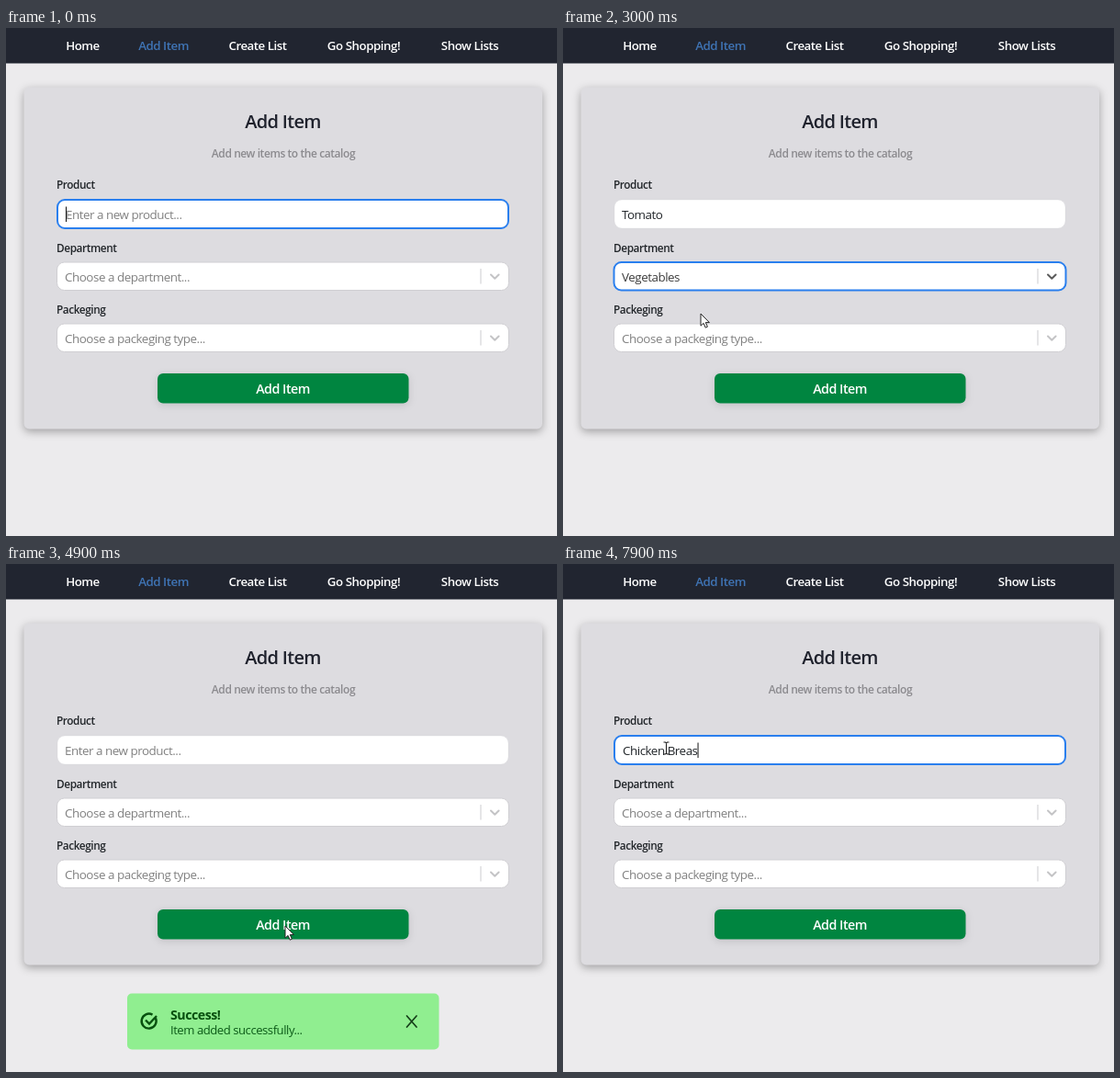
Recreate the animation shown at these times as an HTML page. Size 600 by 553 pixels, loop 8000 ms.

```html
<!DOCTYPE html>
<html lang="en">
<head>
<meta charset="utf-8">
<title>Add Item</title>
<style>
  html, body { margin: 0; width: 100%; height: 100%; overflow: hidden; background: #ecebed; }
  svg { display: block; width: 600px; height: 553px; }
  text { font: 400 13.4px "Open Sans", "Noto Sans", sans-serif; letter-spacing: -.035em; fill: #212529; white-space: pre; }
  .nav text { font-weight: 600; font-size: 13.3px; fill: #fff; text-anchor: middle; }
  .nav .active { fill: #3f74b5; }
  .title { font-size: 20px; font-weight: 600; text-anchor: middle; fill: #1f222d; }
  .sub { font-size: 12px; font-weight: 600; text-anchor: middle; fill: #8b8a8e; }
  .label { font-size: 11.8px; font-weight: 600; }
  .hint { fill: #808080; }
  .value { fill: #3c3c3c; }
  .button { font-size: 14.25px; font-weight: 600; text-anchor: middle; fill: #fff; }
  .card { fill: #dddce0; filter: drop-shadow(0 3px 5px rgba(0, 0, 0, .32)); }
  .box { fill: #fff; stroke: #cfced2; }
  .focus .box { stroke: #2a7fee; stroke-width: 2; }
  .chevron { fill: none; stroke: #c4c4c6; stroke-width: 2; stroke-linecap: round; stroke-linejoin: round; }
  .focus .chevron { stroke: #5c5c5c; }
  .menu { fill: #fff; filter: drop-shadow(0 1px 3px rgba(0, 0, 0, .35)); }
  .toast text { font-size: 13.1px; fill: #0b5a17; }
  .toast .head { font-size: 14.2px; font-weight: 700; fill: #08500f; }
</style>
</head>
<body>
<svg id="stage" viewBox="0 0 600 553"></svg>
<script>
const LOOP = 8000, STEP = 100, ROW = 30.2;
const stage = document.getElementById("stage");

function add(parent, tag, attrs = {}, content = "") {
  const node = document.createElementNS("http://www.w3.org/2000/svg", tag);
  for (const key in attrs) node.setAttribute(key, attrs[key]);
  node.textContent = content;
  return parent.appendChild(node);
}
const group = (parent, cls = "") => add(parent, "g", { class: cls });
const rect = (parent, x, y, width, height, attrs) => add(parent, "rect", { x, y, width, height, ...attrs });
const label = (parent, x, y, content, cls = "") => add(parent, "text", { x, y, class: cls }, content);
const path = (parent, d, attrs) => add(parent, "path", { d, ...attrs });
const show = (node, on) => node.setAttribute("visibility", on ? "visible" : "hidden");

// Page
rect(stage, 0, 0, 600, 553, { fill: "#ecebed" });
rect(stage, 0, 0, 600, 38.5, { fill: "#212530" });
const nav = group(stage, "nav");
[["Home", 83.5], ["Add Item", 171.5], ["Create List", 274], ["Go Shopping!", 389.5], ["Show Lists", 505]]
  .forEach(([name, x], i) => label(nav, x, 24, name, i === 1 ? "active" : ""));
rect(stage, 19.5, 64.5, 564.5, 372, { rx: 6, class: "card" });
label(stage, 301.5, 109, "Add Item", "title");
label(stage, 302, 141, "Add new items to the catalog", "sub");

// Form
label(stage, 55, 175, "Product", "label");
const product = group(stage);
const productBox = rect(product, 56, 187, 491, 31, { rx: 8, class: "box" });
const productText = label(product, 64, 208, "");
const caret = rect(product, 65, 194.5, 1, 16.5, { fill: "#111" });

function makeSelect(name, y, hint) {
  label(stage, 55, y - 11, name, "label");
  const node = group(stage);
  rect(node, 55.5, y, 492, 30.5, { rx: 8, class: "box" });
  rect(node, 516.5, y + 7, 1, 16.5, { fill: "#cccccf" });
  path(node, `M528 ${y + 13.5}l4.3 4.3 4.3-4.3`, { class: "chevron" });
  const text = label(node, 64, y + 21, "");
  return {
    update(focused, value) {
      node.setAttribute("class", focused ? "focus" : "");
      text.textContent = value || hint;
      text.setAttribute("class", value ? "value" : "hint");
    }
  };
}
const department = makeSelect("Department", 255, "Choose a department...");
const packaging = makeSelect("Packeging", 322, "Choose a packeging type...");

rect(stage, 165, 376, 273.5, 32.5, { rx: 6, fill: "#008540", style: "filter:drop-shadow(0 2px 4px rgba(0,0,0,.12))" });
label(stage, 301.5, 398, "Add Item", "button");

// Menus
function makeMenu(y, height, rowWidth, names) {
  const node = group(stage);
  const top = y + 3.3;
  rect(node, 55, y, 493, height, { rx: 3, class: "menu" });
  const mark = rect(node, 55.5, top, rowWidth, ROW, { fill: "#dde9fd" });
  names.forEach((name, i) => label(node, 65, top + 20.5 + i * ROW, name));
  return {
    node,
    hover(pointerY) {
      const i = Math.floor((pointerY - top) / ROW);
      mark.setAttribute("y", top + Math.max(0, Math.min(names.length - 1, i)) * ROW);
    }
  };
}
const departments = makeMenu(292, 245, 479, ["Vegetables", "Fruits", "Dairy", "Frozen", "Meats", "Deli", "Canned Food", "Beauty"]);
rect(departments.node, 534.5, 295, 13, 239, { fill: "#f1f1f1" });
rect(departments.node, 535.5, 306, 10.5, 133, { fill: "#c1c1c1" });
path(departments.node, "M538 301l3-3.5 3 3.5z", { fill: "#a3a3a3" });
path(departments.node, "M538 528l3 3.5 3-3.5z", { fill: "#505050" });
const packages = makeMenu(359, 127.5, 492, ["Individual", "KG", "Gram", "Pack"]);

// Toast
const toast = group(stage, "toast");
rect(toast, 132, 467.5, 339.5, 61, { rx: 5, fill: "#90ee90" });
path(toast, "M163 494.5A8 8 0 1 1 159.5 490.6M152 496.5l4 4 8-8.5",
  { fill: "none", stroke: "#08500f", "stroke-width": 2.4 });
label(toast, 179, 496, "Success!", "head");
label(toast, 179, 512, "Item added successfully...");
path(toast, "M436.5 492l10.5 12M447 492l-10.5 12", { stroke: "#143d18", "stroke-width": 1.7, "stroke-linecap": "round" });

// Pointers, each drawn around its hot spot
const arrow = path(stage, "M0 0V13.2L3.1 10.4 5.2 15.2 7.4 14.2 5.3 9.6H9.4Z",
  { fill: "#fff", stroke: "#222", "stroke-width": 1 });
const beam = path(stage, "M-3-6.5H-1L0-5.5 1-6.5H3M0-5.5V5.5M-3 6.5H-1L0 5.5 1 6.5H3",
  { fill: "none", stroke: "#222", "stroke-width": 1.1 });

// Time, x, y
const route = [
  [1000, 128, 212], [1400, 140, 268], [1700, 140, 270], [2300, 151, 302],
  [2500, 150, 311], [3000, 150, 311], [3200, 125, 338], [3300, 122, 342],
  [3500, 98.5, 420], [3800, 106, 377], [3900, 108, 374], [4200, 108, 374],
  [4700, 300, 391], [4900, 304, 394], [5300, 317, 433], [5600, 440, 496],
  [5700, 440, 496], [6200, 112.5, 200.5], [LOOP, 112.5, 200.5]
];
// Time at which each letter is typed
const typing = [
  ["Tomato", [100, 200, 300, 400, 500, 600]],
  ["Chicken Breas", [6400, 6500, 6600, 6700, 6800, 6900, 7000, 7200, 7300, 7500, 7600, 7700, 7900]]
];

function pointerAt(t) {
  const i = route.findIndex(point => point[0] > t);
  if (i < 1) return [route[0][1], route[0][2]];
  const [t0, x0, y0] = route[i - 1], [t1, x1, y1] = route[i];
  const p = (t - t0) / (t1 - t0), k = p * p * (3 - 2 * p);
  return [x0 + (x1 - x0) * k, y0 + (y1 - y0) * k];
}

function render(t) {
  const within = (from, to) => t >= from && t < to;
  const [x, y] = pointerAt(t);
  const [word, times] = typing[t < 4900 ? 0 : 1];
  const typed = word.slice(0, times.filter(at => at <= t).length);
  const editing = t < 1500 || t >= 6200;

  product.setAttribute("class", editing ? "focus" : "");
  productBox.setAttribute("stroke-opacity", editing ? 1 : .25);
  productText.textContent = typed || "Enter a new product...";
  productText.setAttribute("class", typed ? "" : "hint");
  productText.setAttribute("x", editing ? 65 : 64);
  caret.setAttribute("x", 65 + (typed ? productText.getComputedTextLength() : 0));
  show(caret, editing);

  department.update(within(1500, 3200), within(2600, 4900) ? "Vegetables" : "");
  packaging.update(within(3200, 4800), within(3900, 4900) ? "Individual" : "");
  show(departments.node, within(1500, 2600));
  show(packages.node, within(3200, 3900));
  departments.hover(y);
  packages.hover(y);
  show(toast, within(4900, 5700));

  const overInput = y > 187 && y < 218;
  for (const node of [arrow, beam]) node.setAttribute("transform", `translate(${x} ${y})`);
  show(arrow, t >= 1000 && !overInput);
  show(beam, t >= 1000 && overInput);
}

const start = performance.now();
function tick() {
  const t = (performance.now() - start) % LOOP;
  render(Math.floor(t / STEP) * STEP);
  requestAnimationFrame(tick);
}
tick();
</script>
</body>
</html>
```
